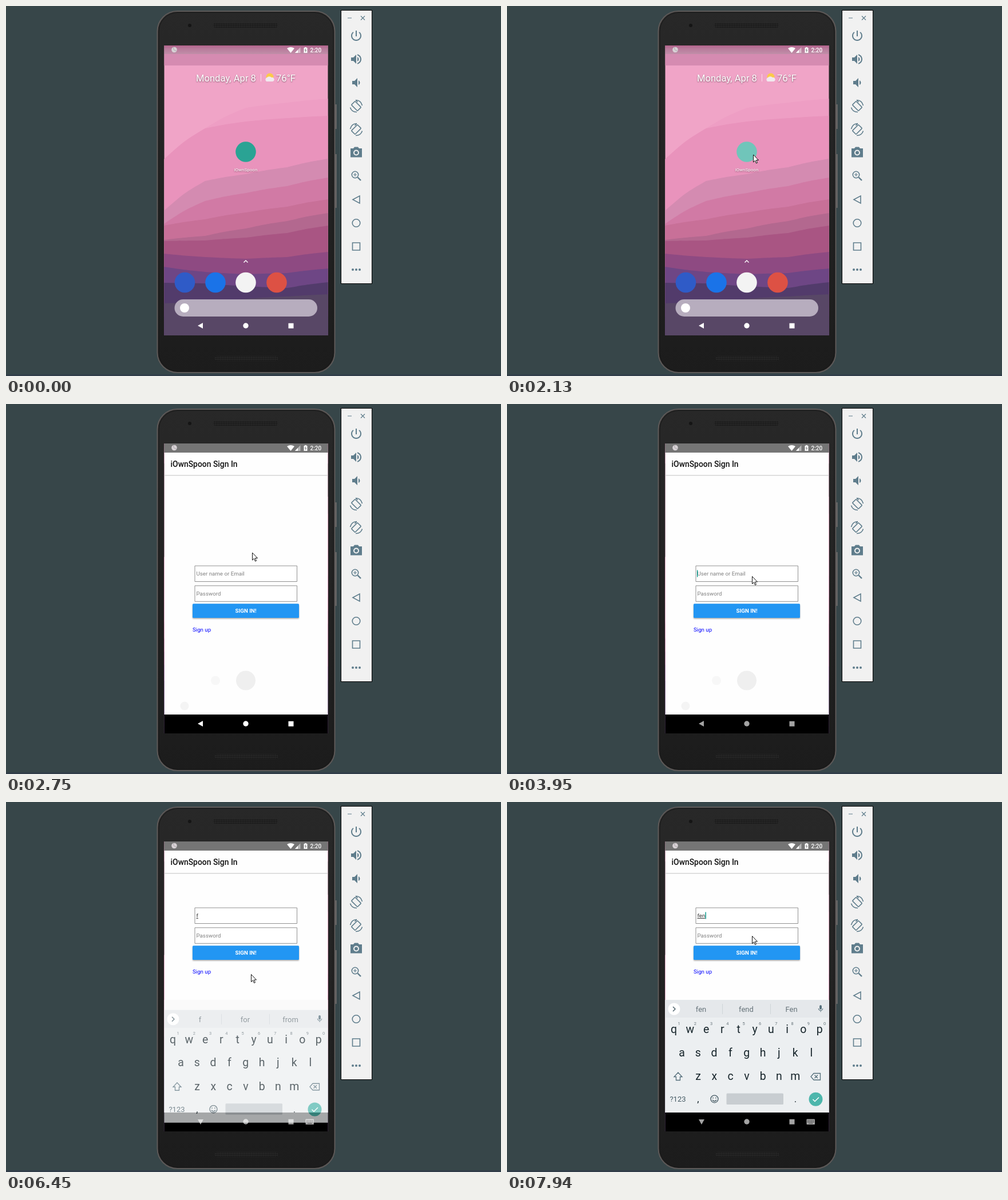
Recreate the animation shown at these times as an HTML page. Size 865 px wide and 647 px high, loop 8000 ms.

```html
<!DOCTYPE html>
<html lang="en">
<head>
<meta charset="utf-8">
<title>Phone sign in</title>
<style>
  html, body { margin: 0; width: 100%; height: 100%; overflow: hidden; background: #374649; }
  svg { display: block; width: 865px; height: 647px; }
  text { font-family: Roboto, sans-serif; white-space: pre; }
  .mid text, text.mid { text-anchor: middle; }
  .home text { fill: #fff; filter: drop-shadow(0 1px 1px #0007); }
  .form { font-size: 9.73px; }
  .hint { fill: #808080; }
  .box { fill: #fff; stroke: #919191; }
  .line { fill: none; stroke: #5f7d8c; stroke-width: 1.6; }
</style>
</head>
<body>
<svg viewBox="0 0 865 647">
  <defs>
    <linearGradient id="body" x2="0" y2="1"><stop stop-color="#282828"/><stop offset="1" stop-color="#1c1c1c"/></linearGradient>
    <linearGradient id="status" x2="0" y2="1"><stop stop-color="#b3638c"/><stop offset=".35" stop-color="#b8799a"/><stop offset="1" stop-color="#c08ea8"/></linearGradient>
    <pattern id="mesh" width="3" height="3" patternUnits="userSpaceOnUse"><rect width="3" height="3" fill="#2b2b2b"/><circle cx="1.5" cy="1.5" r="1.1" fill="#101010"/></pattern>
    <clipPath id="screen"><rect x="276.5" y="69" width="286" height="507"/></clipPath>
    <clipPath id="window"><rect id="reveal" x="276.5" y="69" width="286" height="474"/></clipPath>
    <filter id="soft" x="-10%" y="-30%" width="120%" height="180%"><feDropShadow dx="0" dy="1.5" stdDeviation="1" flood-opacity=".35"/></filter>
  </defs>

  <rect width="865" height="647" fill="#374649"/>
  <rect y="644" width="865" height="3" fill="#313e49"/>

  <!-- phone -->
  <path d="M576.5 172v43M576.5 259v94" stroke="#77706e" stroke-width="2"/>
  <rect x="264.5" y="9" width="310" height="632" rx="35" fill="url(#body)" stroke="#5d5958" stroke-width="2"/>
  <rect x="267" y="11.500" width="305" height="627" rx="33" fill="none" stroke="#191919"/>
  <circle cx="321" cy="34" r="3" fill="#151515"/>
  <rect x="362" y="29.500" width="113" height="8.500" rx="4" fill="url(#mesh)"/>
  <rect x="365" y="612" width="110" height="8.500" rx="4" fill="url(#mesh)"/>

  <g clip-path="url(#screen)">
    <g class="home">
      <rect x="276" y="69" width="287" height="507" fill="#f0a4c7"/>
      <g id="hills"></g>
      <rect x="276" y="84" width="287" height="20" fill="#d58bb1"/>
      <rect x="276" y="69" width="287" height="15" fill="url(#status)"/>
      <rect x="276" y="543" width="287" height="33" fill="#584766"/>
      <text x="332" y="131.500" font-size="16.600">Monday, Apr 8</text>
      <path d="M445.500 119v13" stroke="#fff9"/>
      <circle cx="461" cy="124" r="6.500" fill="#fbc94a"/>
      <path d="M455 132a4 4 0 0 1 1-7 5 4.500 0 0 1 8 0 3.500 3.500 0 0 1 2 7z" fill="#f1e9ee"/>
      <text x="472" y="131.500" font-size="16.600">76°F</text>
      <circle id="launcher" cx="419" cy="255" r="17.800"/>
      <text class="mid" x="419" y="289" font-size="8">iOwnSpoon</text>
      <path d="M415.500 448.500l3.500-3.500 3.500 3.500" fill="none" stroke="#fff" stroke-width="1.400"/>
      <circle cx="312.500" cy="483.500" r="17.800" fill="#2f5bc7"/>
      <circle cx="366" cy="483.500" r="17.800" fill="#1a73e8"/>
      <circle cx="419" cy="483.500" r="17.800" fill="#f3f3f3"/>
      <circle cx="473" cy="483.500" r="17.800" fill="#dd5144"/>
      <rect x="294.500" y="513" width="249.500" height="30" rx="15" fill="#b7adbe"/>
      <circle cx="312" cy="528" r="8" fill="#fff"/>
    </g>

    <!-- sign-in window -->
    <g id="app" clip-path="url(#window)"><g id="page">
      <rect x="276" y="85" width="287" height="500" fill="#fefefe"/>
      <g id="ghosts" fill="#efefef"><circle cx="419" cy="483.500" r="17"/><circle cx="366" cy="483.500" r="8" fill="#f7f7f7"/><circle cx="312" cy="528" r="7.500" fill="#f4f4f4"/></g>
      <rect id="under" x="276" y="346" width="287" height="197" fill="#fafafa"/>
      <path d="M276 124.700h287" stroke="#d6d6d6" stroke-width="1.600"/>
      <text x="287.500" y="109.500" font-size="13.900" font-weight="500" fill="#111">iOwnSpoon Sign In</text>
      <g id="form" class="form">
        <path class="box" d="M330 283h178.500v27.500h-178.500z"/>
        <text id="user" x="332.500" y="300"></text>
        <path id="caret" d="M0 290.500v12" stroke="#009688" stroke-width="1.400"/>
        <path class="box" d="M330 317.800h178.500v27.500h-178.500z"/>
        <text class="hint" x="332.500" y="334.800">Password</text>
        <rect x="326" y="349.300" width="186" height="24.700" rx="1.500" fill="#2196f3" filter="url(#soft)"/>
        <text class="mid" x="419" y="365.200" font-weight="700" fill="#fff">SIGN IN!</text>
        <text x="326" y="398" fill="#00f">Sign up</text>
      </g>
      <rect id="cover" x="276" y="346" width="287" height="197" fill="#fafafa"/>
    </g></g>

    <g id="bars">
      <rect x="276" y="69" width="287" height="16" fill="#757575"/>
      <rect x="276" y="543" width="287" height="33"/>
    </g>

    <g id="keyboard" class="mid" fill="#17252b">
      <rect x="276" y="346" width="287" height="197" fill="#eceff1"/>
      <rect x="276" y="346" width="287" height="31" fill="#e5e8eb"/>
      <circle cx="292" cy="362" r="10.500" fill="#fff"/>
      <path d="M290 358l4 4-4 4" fill="none" stroke="#455a64" stroke-width="1.400"/>
      <path d="M376.500 353v18M460.500 353v18" stroke="#cfd4d8"/>
      <g id="words" font-size="13" fill="#66737a"></g>
      <path transform="translate(540.500 354) scale(.63)" fill="#546e7a" d="M12 14c1.700 0 3-1.300 3-3V5c0-4-6-4-6 0v6c0 1.700 1.300 3 3 3zm5-3c0 2.800-2.200 5.100-5 5.100S7 13.800 7 11H5.300c0 3.400 2.700 6.200 6 6.700V21h1.400v-3.300c3.300-.5 6-3.300 6-6.700z"/>
      <g id="keys" font-size="19.500"></g>
      <path d="M299 473l7 7.500h-3.500v6h-7v-6h-3.500zM536 474.500h11.500v11.500h-11.500l-5-5.700zM537.500 477.500l5.500 5.500m0-5.500l-5.500 5.500" fill="none" stroke="#546e7a" stroke-width="1.300"/>
      <text x="298.500" y="524" font-size="13" fill="#455a64">?123</text>
      <text x="334" y="525" font-size="17">,</text>
      <text x="504" y="525" font-size="17">.</text>
      <path d="M369 519.300a6.500 6.500 0 1 0-13 0a6.500 6.500 0 1 0 13 0M359 521q3.500 4.500 7 0M360 516.500v2M365 516.500v2" fill="none" stroke="#455a64" stroke-width="1.300"/>
      <rect x="383.500" y="509.500" width="99.500" height="19.500" rx="1.500" fill="#c8cdd1"/>
      <circle cx="539.500" cy="519.700" r="12" fill="#4db6ac"/>
      <path d="M534.500 520l3.500 3.500 7-7" fill="none" stroke="#fff" stroke-width="1.500"/>
    </g>

    <!-- status and navigation icons -->
    <g fill="#fff">
      <circle cx="294" cy="76.500" r="4.800" fill="#d8d2d6"/>
      <path d="M293 72.500a4 4 0 0 0 4.500 5.500" fill="none" stroke="#aaa2a8"/>
      <path d="M491 74q6.500-4 13 0l-6.500 8z"/>
      <path d="M505 82h9.500v-10z" fill="#fff7"/><path d="M505 82h5v-5.300z"/>
      <path d="M522 72h3v1h1.500v9h-6v-9h1.500z"/>
      <path d="M524 74.500l-1.500 3h2l-1.500 3" fill="none" stroke="#777"/>
      <text x="531.500" y="80.500" font-size="10" font-weight="500">2:20</text>
      <g id="nav">
        <path id="back"/>
        <circle cx="419" cy="559" r="4.700"/>
        <rect x="493.500" y="554.700" width="9" height="9"/>
        <g id="switcher"><rect x="523.500" y="554.500" width="14.500" height="9.500" rx="1"/><path d="M525 557h11.500M525 559.500h11.500M527.500 562h6.500" stroke="#222" stroke-dasharray="1.500 1"/></g>
      </g>
    </g>
  </g>

  <!-- emulator toolbar -->
  <rect x="585.500" y="7.500" width="54" height="478" fill="#f1f1f1" stroke="#000"/>
  <g fill="#5f7d8c">
    <path class="line" style="stroke-width:1.200" d="M597 21h7M620 17.500l7 7m0-7l-7 7"/>
    <path transform="translate(600 40)" d="M13 3h-2v10h2V3zm4.830 2.170l-1.420 1.420C17.990 7.860 19 9.810 19 12c0 3.870-3.130 7-7 7s-7-3.130-7-7c0-2.190 1.010-4.140 2.580-5.420L6.170 5.170C4.230 6.820 3 9.260 3 12c0 4.970 4.030 9 9 9s9-4.030 9-9c0-2.740-1.230-5.180-3.170-6.830z"/>
    <path transform="translate(600 81)" d="M3 9v6h4l5 5V4L7 9H3zm13.500 3c0-1.770-1.020-3.290-2.500-4.030v8.050c1.480-.73 2.500-2.250 2.500-4.020zM14 3.230v2.060c2.890.86 5 3.540 5 6.710s-2.110 5.850-5 6.710v2.060c4.010-.91 7-4.490 7-8.770s-2.990-7.860-7-8.770z"/>
    <path transform="translate(600 122)" d="M18.500 12c0-1.770-1.020-3.290-2.500-4.030v8.050c1.480-.73 2.500-2.250 2.500-4.020zM5 9v6h4l5 5V4L9 9H5z"/>
    <g id="rotate" class="line"><rect x="-4.500" y="-7.500" width="9" height="15" rx="1" transform="translate(612 175) rotate(-45)"/><path d="M611 164.500q9 0 11.500 9.500M611 164.500l3.500 3.500M613 185.500q-9 0-11.500-8"/></g>
    <use href="#rotate" transform="matrix(-1 0 0 1 1224 41)"/>
    <path d="M609 246.500l-2 2.500h-5v15.500h20v-15.500h-5l-2-2.500z"/>
    <circle cx="612" cy="256.500" r="4" fill="none" stroke="#f1f1f1" stroke-width="2"/>
    <g class="line"><circle cx="610" cy="295" r="5.700"/><path d="M614.500 299.500l5.500 5.500" stroke-width="2.400"/><path d="M607 295h6m-3-3v6" stroke-width="1.200"/>
      <path d="M606 338.500l12-6.500v13z"/><circle cx="612" cy="379.500" r="6.800"/><path d="M605.500 414h13v13h-13z"/></g>
    <circle cx="606" cy="461" r="2"/><circle cx="612" cy="461" r="2"/><circle cx="618" cy="461" r="2"/>
  </g>

  <path id="cursor" d="M.5.500v13l3-2.800 2 4.800 2-.9-2-4.600h4z" fill="#fff" stroke="#111" stroke-width="1"/>
</svg>

<script>
const $ = id => document.getElementById(id);
const show = (id, on) => $(id).style.display = on ? '' : 'none';
const set = (id, attrs) => { for (const k in attrs) $(id).setAttribute(k, attrs[k]); };
const ramp = (t, from, to) => Math.min(1, Math.max(0, (t - from) / (to - from)));
const smooth = p => p * p * (3 - 2 * p);
const mix = (a, b, p) => a + (b - a) * p;
const text = (x, y, s, extra = '') => `<text x="${x}" y="${y}" ${extra}>${s}</text>`;

// Wallpaper: each ridge has a colour and heights at five even steps across the screen.
const ridges = [
  ['#ee9ec4', 268, 214, 178, 169, 162], ['#e993bc', 268, 214, 202, 196, 192],
  ['#d48bb1', 358, 306, 294, 282, 267], ['#d17aa5', 381, 341, 327, 315, 300],
  ['#c87098', 384, 373, 361, 351, 338], ['#b3688f', 409, 402, 389, 376, 362],
  ['#a95583', 411, 410, 405, 397, 384], ['#8e4a82', 433, 439, 442, 439, 430],
  ['#6e4685', 456, 465, 469, 467, 459], ['#523b6b', 484, 485, 490, 493, 483],
  ['#584766', 520, 518, 512, 508, 504]
];
$('hills').innerHTML = ridges.map(([color, ...ys]) => {
  const step = 71.75;
  let d = `M276 580V${ys[0]}`;
  ys.slice(1).forEach((y, i) => {
    const x = 276 + step * i, m = x + step / 2;
    d += `C${m} ${mix(ys[i], y, .6)} ${m} ${mix(ys[i], y, .6)} ${x + step} ${y}`;
  });
  return `<path fill="${color}" d="${d}V580z"/>`;
}).join('');

const rows = [['qwertyuiop', 291.5, 404], ['asdfghjkl', 305.5, 444.5], ['zxcvbnm', 334, 486]];
$('keys').innerHTML = rows.map(([letters, x, y], row) => [...letters].map((c, i) => {
  const kx = x + 28.3 * i;
  return text(kx, y, c) + (row ? '' : text(kx + 9, 389.5, (i + 1) % 10, 'font-size="7.500" fill="#66737a"'));
}).join('')).join('');

const typing = [
  { from: 0, value: '', end: 332.7, words: ['f', 'for', 'from'] },
  { from: 5210, value: 'f', end: 336.3, words: ['f', 'for', 'from'] },
  { from: 6640, value: 'fe', end: 341.5, words: ['fe', 'few', 'feel'] },
  { from: 6780, value: 'fen', end: 347.2, words: ['fen', 'fend', 'Fen'] }
];
const caretOn = [[3880, 4370], [4880, 6300], [6680, 7340], [7890, 8000]];

function pointer(t) {
  if (t < 1480) {
    const p = smooth(ramp(t, 660, 1450)), q = 1 - p;
    const curve = (a, b, c) => q * q * a + 2 * q * p * b + p * p * c;
    return [curve(680, 530, 432), curve(596, 480, 259)];
  }
  const down = smooth(ramp(t, 3140, 3440)), up = smooth(ramp(t, 7140, 7540));
  const settle = ramp(t, 7660, 7750);
  return [mix(430, 428, down), mix(259.5, 301, down) - 83 * up + 15 * settle + (t >= 7890 ? 1 : 0)];
}

let shown;
function draw(t) {
  show('cursor', t >= 700);
  set('cursor', { transform: `translate(${pointer(t)})` });
  set('launcher', { fill: t < 2130 ? '#2aa394' : '#70c5ba' });

  const rest = (1 - ramp(t, 2340, 2590)) ** 2;
  const top = 85 + 42 * rest;
  show('app', t >= 2370);
  set('app', { opacity: ramp(t, 2330, 2430) });
  set('reveal', { y: top, height: 543 - 63 * rest - top });
  set('page', { transform: `translate(0 ${24 * rest})` });
  show('bars', t >= 2710);

  show('ghosts', t < 5260);
  show('under', t >= 5260);
  show('cover', t >= 6000);
  set('form', { transform: `translate(0 ${t < 6180 ? 0 : -98})` });

  const state = typing.findLast(s => t >= s.from);
  if (state !== shown) {
    shown = state;
    $('user').textContent = state.value || 'User name or Email';
    set('user', { fill: state.value ? '#333' : '#808080', 'text-decoration': state.value ? 'underline' : 'none' });
    $('words').innerHTML = state.words.map((w, i) => text(339 + 79 * i, 367, w)).join('');
  }
  show('caret', caretOn.some(([a, b]) => t >= a && t < b));
  set('caret', { transform: `translate(${state.end} 0)` });

  const sink = (1 - ramp(t, 6350, 6600)) ** 2;
  show('keyboard', t >= 6350);
  set('keyboard', { transform: `translate(0 ${50 * sink})`, opacity: 1 - .85 * sink });

  const typed = t >= 5310;
  set('nav', { opacity: mix(1, .64, ramp(t, 3300, 3700)) });
  set('back', { d: typed ? 'M335 555h10l-5 9z' : 'M335 559l9-5v10z' });
  show('switcher', typed);
}

function tick() {
  draw(performance.now() % 8000);
  requestAnimationFrame(tick);
}
tick();
</script>
</body>
</html>
```
